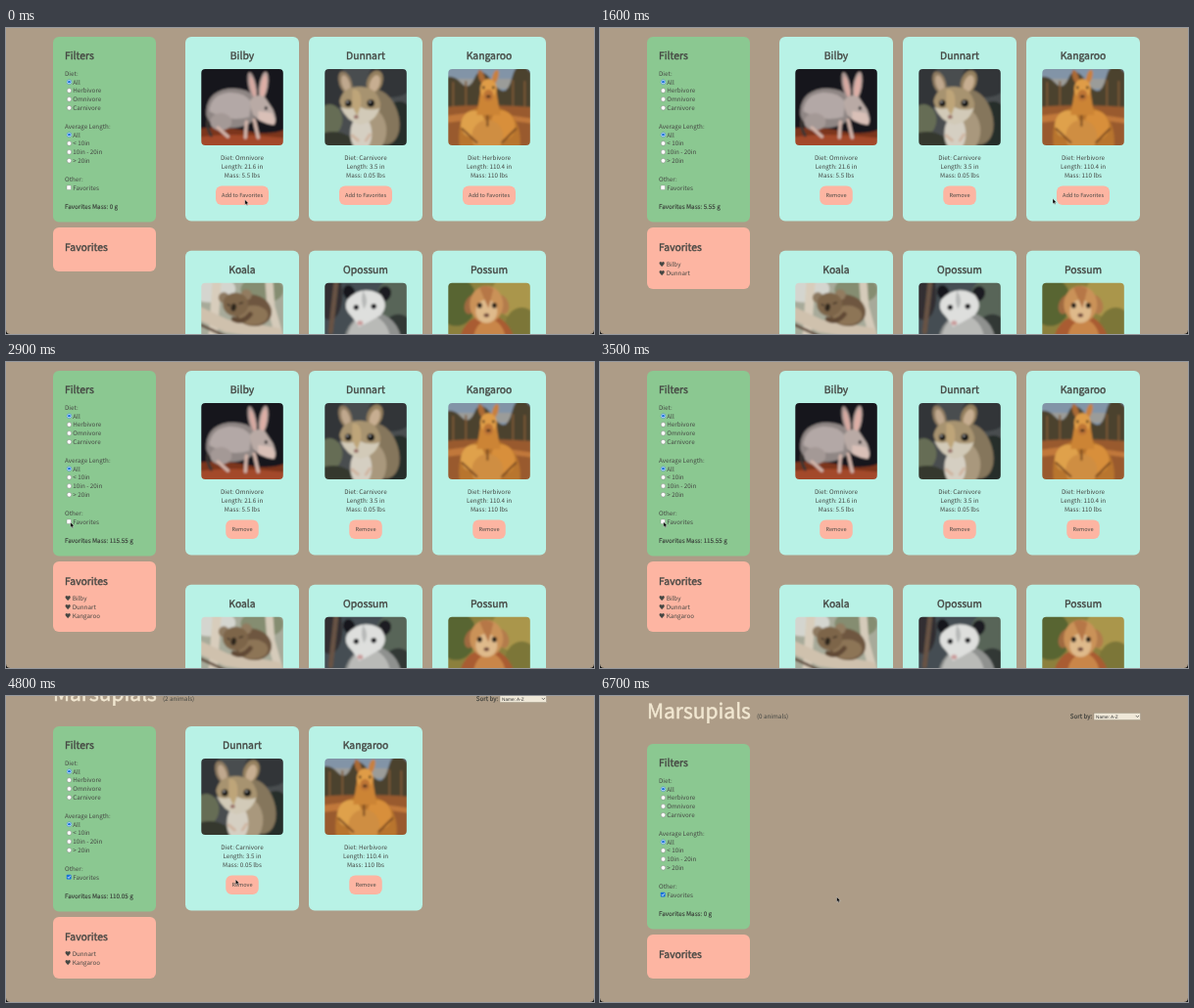
Animation of 600 by 313 pixels, one loop 7400 ms. Source, as an HTML page:

```html
<!DOCTYPE html>
<html lang="en">
<head>
<meta charset="utf-8">
<title>Marsupials</title>
<style>
  html, body { margin: 0; width: 100%; height: 100%; overflow: hidden; background: #ad9c87; }
  svg { display: block; width: 600px; height: 313px; }
  text {
    font: 6.27px "Noto Sans CJK JP", "Noto Sans CJK SC", "Noto Sans CJK", "Open Sans", sans-serif;
    fill: #454743; white-space: pre; text-rendering: geometricPrecision;
  }
  .h1 { font-size: 21px; fill: #f2e8d2; stroke: #f2e8d2; stroke-width: .45px; }
  .h2 { font-size: 10.35px; stroke: #454743; stroke-width: .38px; }
  .strong { fill: #353835; stroke: #353835; stroke-width: .12px; }
  .mid { text-anchor: middle; }
  .btn { font-size: 5.6px; }
  .sel { font: 4.75px "Liberation Sans", Arial, sans-serif; fill: #333; }
</style>
</head>
<body>
<svg viewBox="0 0 600 313">
  <defs>
    <clipPath id="frame"><rect width="83.5" height="78" rx="4"/></clipPath>
    <filter id="soft" x="-10%" y="-10%" width="120%" height="120%"><feGaussianBlur stdDeviation=".9"/></filter>
  </defs>
  <rect width="600" height="313" fill="#ad9c87"/>
  <g id="page"></g>
  <path d="M0 308.5V313H4.5Q0 313 0 308.5ZM600 308.5V313H595.5Q600 313 600 308.5Z" fill="#111"/>
  <path id="cursor" d="M0 0V5.3L1.2 4.2 2 6 2.9 5.6 2.1 3.9H3.8Z" fill="#000" stroke="#fff" stroke-width=".35"/>
</svg>
<script>
const LOOP = 7400, STEP = 100, FULL_SCROLL = 40;
const MINT = '#b8f2e6', GREEN = '#8bc891', SALMON = '#fdb5a2', BLUE = '#1671d9';

const text = (x, y, s, cls = '') => `<text x="${x}" y="${y}" class="${cls}">${s}</text>`;
const box = (x, y, w, h, fill, r = 0) => `<rect x="${x}" y="${y}" width="${w}" height="${h}" rx="${r}" fill="${fill}"/>`;
const oval = (x, y, rx, ry, fill, turn = 0) =>
  `<ellipse cx="${x}" cy="${y}" rx="${rx}" ry="${ry}" fill="${fill}" transform="rotate(${turn} ${x} ${y})"/>`;
const shape = (d, fill) => `<path d="${d}" fill="${fill}"/>`;
const line = (d, color, w) => `<path d="${d}" fill="none" stroke="${color}" stroke-width="${w}" stroke-linecap="round"/>`;
const back = fill => box(-4, -4, 92, 86, fill);

// Simplified pictures, each 83.5 by 78
const photos = {
  Bilby: back('#17181c') + shape('M-4 61Q20 57 45 63T88 61V82H-4Z', '#7c341b') +
    shape('M-4 70Q30 64 88 71V82H-4Z', '#a3492a') +
    line('M9 48Q3 56 10 68', '#3b3433', 3) +
    shape('M5 47Q4 24 27 20Q47 18 56 30L54 52Q43 62 25 60Q9 60 5 47Z', '#8f8684') +
    shape('M8 43Q10 26 28 24Q44 23 51 34L49 49Q28 55 8 43Z', '#b3a8a6') +
    oval(20, 54, 11, 9, '#a49996') + line('M17 60L27 69M46 54L45 70M54 52L58 70', '#cfb2a8', 3.5) +
    oval(52, 17, 4, 14, '#a99490', -12) + oval(52.5, 18, 2.2, 11, '#d8aaa2', -12) +
    oval(63.5, 17, 4.5, 14.5, '#b59f99', 9) + oval(63.5, 18, 2.7, 12, '#deafa6', 9) +
    shape('M50 32Q56 24 65 29L73 41Q78 53 74 57Q66 56 60 53Q49 47 50 32Z', '#b9aaa5') +
    shape('M58 43L72 45Q77 54 74 57Q65 56 58 51Z', '#d9c0b7') +
    oval(66, 40, 1.6, 1.7, '#17161a'),
  Dunnart: back('#4a4e50') + oval(8, 18, 15, 24, '#303638') + oval(68, 10, 24, 19, '#303438') +
    oval(5, 52, 13, 16, '#666d55') + shape('M-4 66Q22 58 38 82H-4Z', '#34382d') +
    oval(76, 62, 18, 29, '#282e2a') + oval(57, 49, 18, 29, '#85765c', -18) +
    oval(46, 63, 17, 23, '#a9987d') + oval(37, 66, 11, 18, '#d5cfc2') +
    oval(21, 14, 6.5, 12, '#8f7c62', -18) + oval(21.5, 15, 4, 9, '#c0a88e', -18) +
    oval(51, 13, 8, 12, '#95805f', 20) + oval(51, 15, 5, 9, '#c7ae91', 20) +
    shape('M15 33Q18 18 35 18Q54 18 57 36Q56 53 36 56Q20 51 15 33Z', '#a79370') +
    shape('M16 39Q25 43 34 38Q45 44 56 40Q52 54 36 57Q22 53 16 39Z', '#d2cab8') +
    shape('M28 21Q38 19 37 37L33 48L28 38Z', '#bea579') +
    oval(24, 35, 3.3, 3.6, '#111') + oval(47, 35, 3.8, 3.8, '#111') +
    oval(23, 33.8, .8, .8, '#fff') + oval(46, 33.8, .8, .8, '#fff') + oval(32, 49, 2.5, 2, '#987068') +
    line('M28 68L34 73M46 67L42 73', '#cfb5a1', 3),
  Kangaroo: back('#8294a7') + box(-4, 10, 92, 10, '#9b9c99') +
    shape('M-4 9Q5 5 13 14T27 9T46 14T65 9T88 8V45H-4Z', '#4c422e') +
    line('M5 14V47M18 13V45M66 12V45M78 13V49', '#7d5935', 1.8) +
    shape('M-4 39Q35 35 88 39V82H-4Z', '#995a2d') + shape('M-4 48L34 43L88 51V56L42 50L-4 55Z', '#c1783a') +
    shape('M12 82Q8 58 18 45L33 38H49L62 45Q76 57 73 82Z', '#b8752d') +
    oval(25, 56, 12, 14, '#dfa14b', 18) + oval(56, 57, 12, 15, '#d88f3a', -18) +
    oval(40, 69, 16, 17, '#cf8e43') +
    line('M40 46V58M14 61L29 75M69 61L55 75', '#7b4a24', 2) +
    shape('M33 22L29 47H53L49 22Z', '#cc8435') +
    oval(34, 8, 3, 7.5, '#aa6a34', -18) + oval(48, 8, 3, 7.5, '#c88140', 16) +
    oval(41, 20, 8.5, 10, '#df9c46') + oval(41, 27, 5, 6, '#bd7535') +
    oval(36, 19, 1.1, 1.4, '#251b14') + oval(46, 19, 1.1, 1.4, '#251b14') + oval(41, 28, 2.4, 1.6, '#4d3020'),
  Koala: back('#a7aa9a') + oval(10, 6, 25, 14, '#d4d5cf') + oval(62, 7, 22, 14, '#858d71') +
    line('M16 -4L10 82', '#d8cdbc', 9) + line('M69 -4L71 24L82 63', '#d5cbba', 8) +
    line('M-2 31L26 44L76 52', '#cfc1ad', 13) + line('M0 43L28 56L82 62', '#665344', 3) +
    oval(52, 28, 20, 16, '#6e573f', 14) + oval(53, 33, 15, 10, '#8d7557') +
    oval(23, 15, 5.5, 5.5, '#8d7960') + oval(46, 12, 5.5, 5.5, '#927c60') +
    oval(35, 22, 13, 12, '#7d6549') + oval(33, 25, 2.7, 4, '#2d251f', 12) +
    line('M27 22L29 23M39 21L42 20', '#30291f', 1.3) + line('M50 32Q42 42 33 37', '#604a34', 5),
  Opossum: back('#444d52') + oval(5, 12, 13, 26, '#302f30') + line('M12 -4L6 50', '#675344', 5) +
    oval(72, 18, 20, 23, '#596559') + oval(75, 54, 18, 22, '#303735') +
    oval(49, 61, 29, 31, '#8f918f') + oval(45, 60, 22, 27, '#b9bab7') +
    oval(25, 10, 6, 8, '#17191d', -20) + oval(61, 11, 6.5, 8, '#1c1d21', 22) +
    shape('M23 17Q38 1 57 12Q66 23 57 33L43 41L35 45L28 35Q18 26 23 17Z', '#dedfdd') +
    shape('M39 8Q46 18 40 27Q36 18 39 8Z', '#b8bab9') +
    oval(32, 25, 2.7, 2.6, '#15171b', 20) + oval(50, 24, 2.8, 2.6, '#15171b', -20) +
    oval(36, 41, 3, 2.5, '#ca9f9e'),
  Possum: back('#8c803e') + oval(8, 19, 21, 25, '#596531') + oval(68, 12, 24, 23, '#aa964b') +
    oval(75, 48, 18, 23, '#7c7638') + shape('M8 82Q9 42 29 35H51Q72 47 69 82Z', '#a95b30') +
    oval(42, 62, 17, 25, '#c98648') +
    oval(23, 22, 6, 10, '#a06a40', 20) + oval(55, 22, 6.5, 10, '#b37c4c', -20) +
    oval(39, 22, 17, 19, '#ca9258') + oval(39, 29, 11, 12, '#dfba8b') +
    shape('M32 5Q39 1 46 6L41 26Z', '#b67746') +
    oval(32, 23, 2.5, 2.8, '#221a16') + oval(47, 23, 2.5, 2.8, '#221a16') + oval(39, 33, 2.8, 2, '#72483a')
};

const animals = [
  ['Bilby', 'Omnivore', 21.6, 5.5],
  ['Dunnart', 'Carnivore', 3.5, 0.05],
  ['Kangaroo', 'Herbivore', 110.4, 110],
  ['Koala', 'Herbivore', 28, 20],
  ['Opossum', 'Omnivore', 20, 8],
  ['Possum', 'Omnivore', 18, 6]
];

// Each click toggles a favorite or the favorites filter
const clicks = [
  [300, 'Bilby'], [1000, 'Dunnart'], [1900, 'Kangaroo'], [3700, 'filter'],
  [4500, 'Bilby'], [5000, 'Dunnart'], [6400, 'Kangaroo']
];

const path = [
  [0, 243.8, 175.6], [400, 243.8, 175.6], [900, 366, 175], [1200, 368, 175.5],
  [1600, 462, 174.5], [1800, 489, 173], [2100, 489, 173], [2400, 152.8, 205],
  [2800, 66, 164], [3500, 64.8, 163.5], [3800, 64.8, 163.5], [4200, 233, 186.5],
  [4700, 233, 186.5], [5000, 237, 190], [5500, 241, 195.5], [5600, 241, 195.5],
  [5800, 241.6, 205.5], [LOOP, 241.6, 205.5]
];

function stateAt(t) {
  const on = new Set();
  for (const [time, name] of clicks)
    if (time <= t) on.has(name) ? on.delete(name) : on.add(name);
  const filtered = on.delete('filter');
  return { filtered, favorites: animals.filter(([name]) => on.has(name)) };
}

function cursorAt(t) {
  const i = path.findIndex(p => p[0] > t);
  const [t0, x0, y0] = path[i - 1], [t1, x1, y1] = path[i];
  const k = (t - t0) / (t1 - t0);
  return [x0 + (x1 - x0) * k, y0 + (y1 - y0) * k];
}

function card([name, diet, length, mass], i, favorite) {
  const x = 183 + 126 * (i % 3), y = 49 + 218.8 * Math.floor(i / 3);
  const w = favorite ? 33.5 : 54;
  return `<g transform="translate(${x} ${y})">` + box(0, 0, 116, 188.5, MINT, 6) +
    text(58, 23.4, name, 'h2 mid') +
    `<g transform="translate(16.3 33)" clip-path="url(#frame)"><g filter="url(#soft)">${photos[name]}</g></g>` +
    text(58, 126.3, `Diet: ${diet}`, 'mid') +
    text(58, 135.2, `Length: ${length} in`, 'mid') +
    text(58, 143.9, `Mass: ${mass} lbs`, 'mid') +
    box(58 - w / 2, 152.4, w, 19.5, SALMON, 6) +
    text(58, 164.3, favorite ? 'Remove' : 'Add to Favorites', 'btn mid') + '</g>';
}

function radios(y, labels) {
  return labels.map((label, i) => {
    const cy = y + i * 8.85;
    const dot = i ? '' : `<circle cx="64.5" cy="${cy}" r="1.35" fill="${BLUE}"/>`;
    return `<circle cx="64.5" cy="${cy}" r="2.3" fill="#fff" stroke="${i ? '#858585' : BLUE}" stroke-width=".5"/>` +
      dot + text(68.3, cy + 2.4, label);
  }).join('');
}

function sidebar({ filtered, favorites }) {
  const mass = +favorites.reduce((sum, a) => sum + a[3], 0).toFixed(2);
  const check = filtered
    ? box(61.8, 200.8, 4.8, 4.8, BLUE, .8) + line('M63 203.3L64 204.4L65.6 202', '#fff', .7)
    : `<rect x="62" y="201" width="4.4" height="4.4" rx=".7" fill="#fff" stroke="#858585" stroke-width=".4"/>`;
  return box(48, 49, 105, 189.5, GREEN, 6) + text(60, 72.4, 'Filters', 'h2') +
    text(60, 88.7, 'Diet:') + radios(95.2, ['All', 'Herbivore', 'Omnivore', 'Carnivore']) +
    text(60, 142.8, 'Average Length:') + radios(149.2, ['All', '&lt; 10in', '10in - 20in', '&gt; 20in']) +
    text(60, 196.8, 'Other:') + check + text(68.3, 205.6, 'Favorites') +
    text(60, 224.7, `Favorites Mass: ${mass} g`, 'strong') +
    box(48, 244, 105, 45 + 9 * favorites.length, SALMON, 6) + text(60, 267.6, 'Favorites', 'h2') +
    favorites.map(([name], i) => text(60, 284 + 9 * i, `♥ ${name}`)).join('');
}

function header(count) {
  return text(48, 23, 'Marsupials', 'h1') + text(160, 23, `(${count} animals)`) +
    text(479.7, 23, 'Sort by:', 'strong') +
    `<rect x="504" y="17.4" width="47.5" height="7.2" fill="#efe8d8" stroke="#8b8272" stroke-width=".4"/>` +
    text(506, 22.7, 'Name: A-Z', 'sel') + line('M547 20.2L548.4 21.7L549.8 20.2', '#333', .6);
}

const page = document.getElementById('page'), cursor = document.getElementById('cursor');
const start = performance.now();
let shown = '';

function draw() {
  const elapsed = (performance.now() - start) % LOOP;
  const t = Math.floor(elapsed / STEP) * STEP;
  const state = stateAt(t), { filtered, favorites } = state;
  const key = filtered + favorites.join();
  if (key !== shown) {
    shown = key;
    const list = filtered ? favorites : animals;
    page.innerHTML = header(list.length) + sidebar(state) +
      list.map((a, i) => card(a, i, favorites.includes(a))).join('');
    // The short filtered page limits how far it can stay scrolled
    page.setAttribute('transform', `translate(0 ${filtered ? -9 * favorites.length : -FULL_SCROLL})`);
  }
  cursor.setAttribute('transform', `translate(${cursorAt(t)})`);
  requestAnimationFrame(draw);
}
draw();
</script>
</body>
</html>
```
